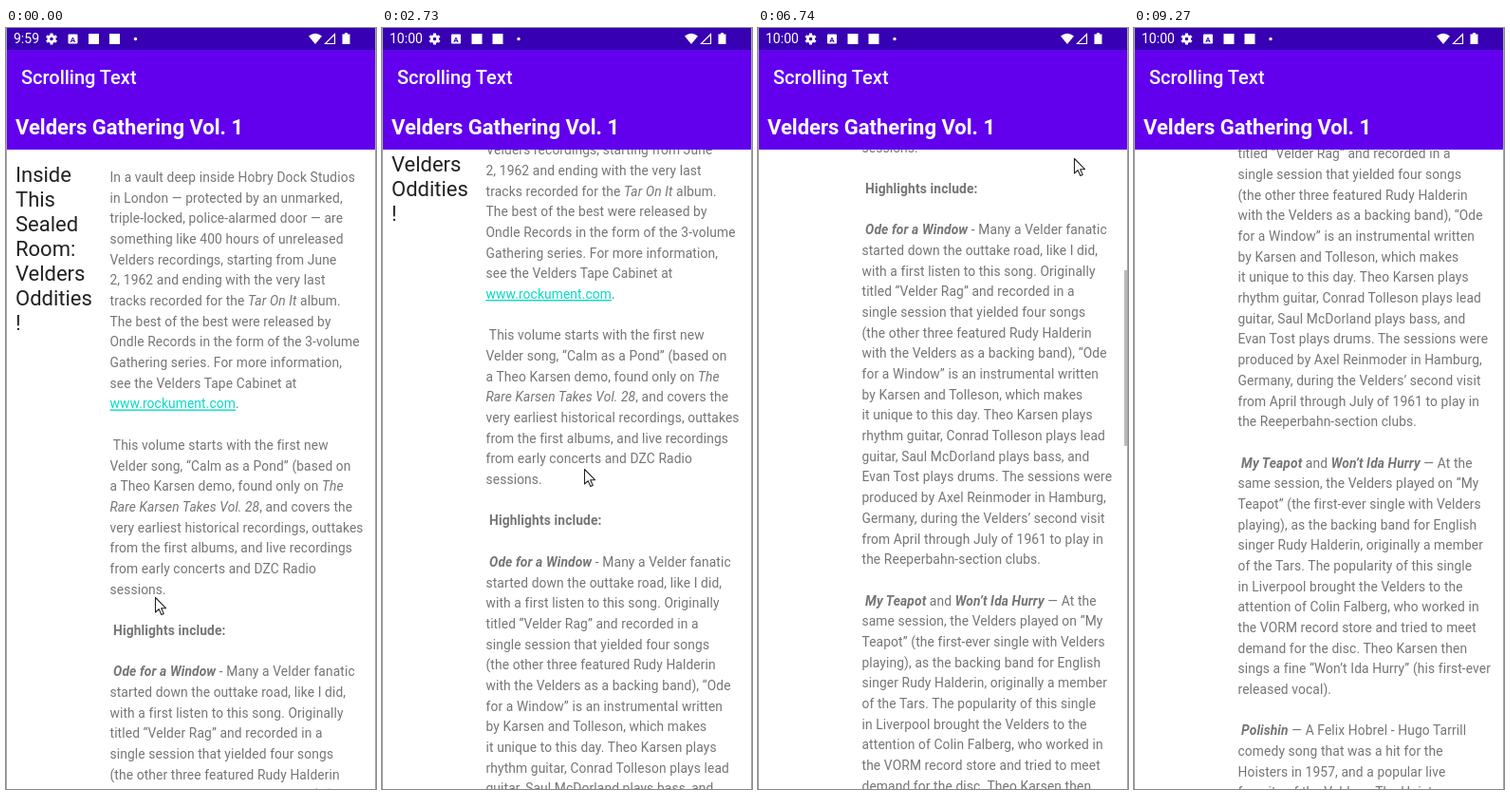
Write an HTML page that moves like this. It is 390 px wide and 801 px high and loops after 9800 ms.

```html
<!DOCTYPE html>
<html lang="en">
<head>
<meta charset="utf-8">
<title>Scrolling Text</title>
<style>
  html, body { margin: 0; width: 100%; height: 100%; overflow: hidden; background: #fff; }
  svg { display: block; width: 390px; height: 801px; font-family: Roboto, sans-serif; }
  text { white-space: pre; }
  .body { font-size: 13.8px; letter-spacing: .12px; fill: #757575; }
  .body i { font-style: italic; }
  .it { font-style: italic; }
  .bold { font-weight: 700; }
  .link { fill: #03dac5; text-decoration: underline; }
  .side { font-size: 22px; fill: #212121; }
</style>
</head>
<body>
<svg viewBox="0 0 390 801">
  <defs><clipPath id="page"><rect y="128" width="390" height="673"/></clipPath></defs>
  <rect width="390" height="801" fill="#fff"/>
  <g clip-path="url(#page)"><g id="article"></g></g>
  <rect id="thumb" x="386" width="3" height="185" fill="#000" fill-opacity=".27"/>

  <rect width="390" height="128" fill="#6200ee"/>
  <rect width="390" height="23" fill="#3700b3"/>
  <text x="16" y="59" font-size="20" font-weight="500" fill="#fff">Scrolling Text</text>
  <text x="10" y="112" font-size="22" font-weight="700" fill="#fff">Velders Gathering Vol. 1</text>

  <g fill="#fff">
    <text id="clock" x="8" y="16" font-size="14"></text>
    <g id="notices">
      <g transform="translate(48 11.5)">
        <g id="gear"></g>
        <circle r="3.2" fill="none" stroke="#fff" stroke-width="2.6"/>
      </g>
      <rect x="65.500" y="6.500" width="10" height="10" rx="1"/>
      <text x="70.500" y="14.500" font-size="8" font-weight="700" text-anchor="middle" fill="#3700b3">A</text>
      <rect x="87" y="6" width="11" height="11"/>
      <rect x="109" y="6" width="11" height="11"/>
      <circle cx="136.500" cy="11.500" r="1.700"/>
    </g>
    <path d="M319 8.500Q326 3 333 8.500L326 17Z"/>
    <path d="M336.500 16.500L346.500 6.500V16.500Z" fill="none" stroke="#fff" stroke-width="1.200"/>
    <path d="M354.500 6.500H357V5H360V6.500H362.500V17H354.500Z"/>
  </g>

  <path d="M.5 0V801M389.500 0V801" stroke="#a6a6a6"/>
  <path id="cursor" d="M.5 .5V16L4.200 12.600L6.800 18.500L9.200 17.400L6.700 11.700H11.500Z"
        fill="#fff" stroke="#222" stroke-width="1.100" stroke-linejoin="round"/>
</svg>
<script>
const LOOP = 9800;
const LINE = 21.68;
const $ = id => document.getElementById(id);

// *italic*, **bold**, ***bold italic***, [link]
const ARTICLE = `In a vault deep inside Hobry Dock Studios
in London — protected by an unmarked,
triple-locked, police-alarmed door — are
something like 400 hours of unreleased
Velders recordings, starting from June
2, 1962 and ending with the very last
tracks recorded for the *Tar On It* album.
The best of the best were released by
Ondle Records in the form of the 3-volume
Gathering series. For more information,
see the Velders Tape Cabinet at
[www.rockument.com].

 This volume starts with the first new
Velder song, “Calm as a Pond” (based on
a Theo Karsen demo, found only on *The*
*Rare Karsen Takes Vol. 28*, and covers the
very earliest historical recordings, outtakes
from the first albums, and live recordings
from early concerts and DZC Radio
sessions.

 **Highlights include:**

 ***Ode for a Window*** - Many a Velder fanatic
started down the outtake road, like I did,
with a first listen to this song. Originally
titled “Velder Rag” and recorded in a
single session that yielded four songs
(the other three featured Rudy Halderin
with the Velders as a backing band), “Ode
for a Window” is an instrumental written
by Karsen and Tolleson, which makes
it unique to this day. Theo Karsen plays
rhythm guitar, Conrad Tolleson plays lead
guitar, Saul McDorland plays bass, and
Evan Tost plays drums. The sessions were
produced by Axel Reinmoder in Hamburg,
Germany, during the Velders’ second visit
from April through July of 1961 to play in
the Reeperbahn-section clubs.

 ***My Teapot*** and ***Won’t Ida Hurry*** — At the
same session, the Velders played on “My
Teapot” (the first-ever single with Velders
playing), as the backing band for English
singer Rudy Halderin, originally a member
of the Tars. The popularity of this single
in Liverpool brought the Velders to the
attention of Colin Falberg, who worked in
the VORM record store and tried to meet
demand for the disc. Theo Karsen then
sings a fine “Won’t Ida Hurry” (his first-ever
released vocal).

 ***Polishin*** — A Felix Hobrel - Hugo Tarrill
comedy song that was a hit for the
Hoisters in 1957, and a popular live
favorite of the Velders. The Hoisters`.split("\n");
const SIDE = ["Inside", "This", "Sealed", "Room:", "Velders", "Oddities", "!"];

const span = (cls, s) => `<tspan class="${cls}">${s}</tspan>`;
const markup = s => s
  .replace(/\*\*\*(.+?)\*\*\*/g, (_, m) => span("bold it", m))
  .replace(/\*\*(.+?)\*\*/g, (_, m) => span("bold", m))
  .replace(/\*(.+?)\*/g, (_, m) => span("it", m))
  .replace(/\[(.+?)\]/g, (_, m) => span("link", m));
const textLine = (cls, x, y, s) => `<text class="${cls}" x="${x}" y="${y}">${markup(s)}</text>`;

$("article").innerHTML =
  SIDE.map((s, i) => textLine("side", 10, 162 + i * 26, s)).join("") +
  ARTICLE.map((s, i) => textLine("body", 109.5, 162 + i * LINE, s)).join("");
$("gear").innerHTML = [0, 60, 120].map(a =>
  `<rect x="-1.5" y="-6" width="3" height="12" transform="rotate(${a})" mask="none"/>`).join("") +
  `<circle r="2" fill="#3700b3"/>`;

// Each value holds until the next time.
const SCROLL = [
  [0, 0], [1730, 8], [1870, 34.5], [1990, 80], [2110, 115.5],
  [5740, 119], [5860, 130], [5990, 162], [6110, 206.5], [6230, 250]
];
const CURSOR = [
  [0, 157, 599], [1230, 161, 602], [1350, 174, 594], [1470, 182, 585],
  [1610, 195, 545], [1730, 206, 503], [1870, 213, 468], [2110, 213, 464],
  [4700, 182, 476], [4850, 171, 508], [4970, 166, 524], [5120, 164, 535],
  [5740, 168, 520], [5860, 182, 488], [5990, 202, 438], [6110, 226, 379],
  [6230, 254, 310], [6350, 282, 242], [6470, 306, 190], [6620, 324, 155],
  [6740, 333, 137], [6860, 352, 133], [6980, 375, 138], [7100, 400, 150],
  [8230, 383, 186], [8350, 370, 310], [8470, 378, 437], [8620, 369, 580],
  [8740, 364, 704], [8880, 357, 742], [9000, 359, 768], [9120, 362, 791],
  [9270, 362, 820]
];
const hold = (track, t) => track.findLast(key => key[0] <= t);

const FLING = { start: 6350, end: 7580, stop: 7844, rest: 610 };
function scrollAt(t) {
  if (t >= FLING.end) return FLING.rest;
  if (t < FLING.start) return hold(SCROLL, t)[1];
  const step = t < 6470 ? 6350 : t < 6620 ? 6470 : 6620 + Math.floor((t - 6620) / 120) * 120;
  return FLING.rest - 145 * ((FLING.stop - step) / 1104) ** 2.36;
}

function thumbOpacity(t) {
  const fade = (from, half, gone) => t < from || t >= gone ? 0 : t < half ? 1 : .5;
  return fade(1730, 2610, 2730) + fade(5740, 7960, 8110);
}

function draw(t) {
  const scroll = scrollAt(t);
  const [, x, y] = hold(CURSOR, t);
  const late = t >= 1990;
  $("article").setAttribute("transform", `translate(0 ${-scroll})`);
  $("thumb").setAttribute("y", 128.6 + scroll * .2716);
  $("thumb").setAttribute("opacity", thumbOpacity(t));
  $("cursor").setAttribute("transform", `translate(${x} ${y})`);
  $("clock").textContent = late ? "10:00" : "9:59";
  $("notices").setAttribute("transform", `translate(${late ? 7.5 : 0} 0)`);
}

const start = performance.now();
function frame() {
  draw((performance.now() - start) % LOOP);
  requestAnimationFrame(frame);
}
draw(0);
requestAnimationFrame(frame);
</script>
</body>
</html>
```
